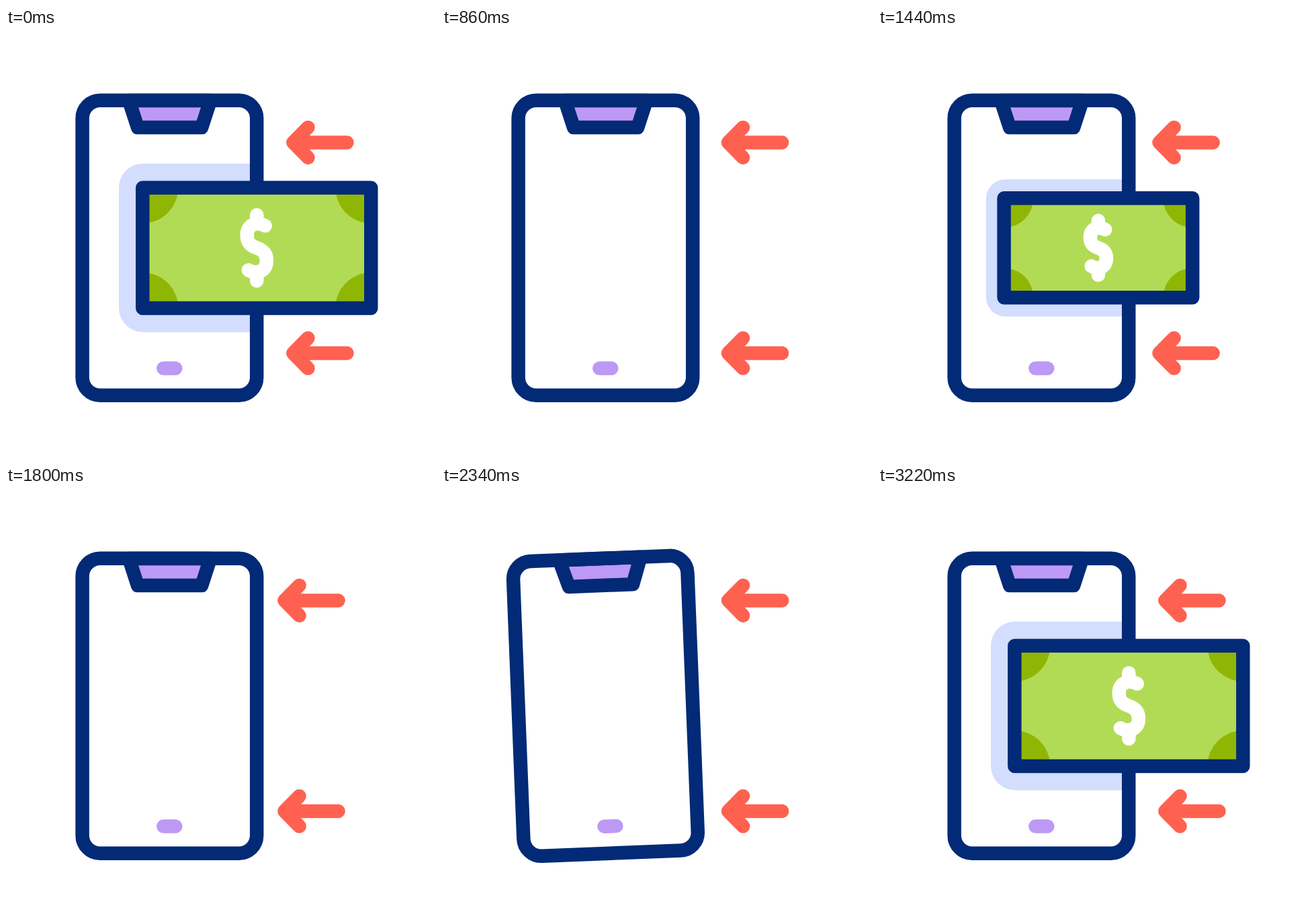
Animation, 640 px wide and 640 px high, one loop 3.62 s. Source, as an HTML page:

```html
<!DOCTYPE html>
<html>
<head>
<meta charset="utf-8">
<style>
html, body { margin: 0; width: 100%; height: 100%; overflow: hidden; background: #fff; }
svg { display: block; width: 100vw; height: 100vh; }
.line { fill: none; stroke: #032a76; stroke-width: 20.5; stroke-linecap: round; stroke-linejoin: round; }
.line, .line * { vector-effect: non-scaling-stroke; }
.red { stroke: #ff6150; }
.white { stroke: #fff; }
.lilac { stroke: #bc99f4; }
</style>
</head>
<body>
<svg viewBox="0 0 640 640">
  <defs>
    <clipPath id="screen"><rect x="113.5" y="107.8" width="249.5" height="439" rx="26"/></clipPath>
    <clipPath id="paper"><rect x="-170" y="-89.6" width="340" height="179.2"/></clipPath>
    <path id="arrow" class="line red" d="M507.5 0H427.5M449.5 -22.5L427.3 0L449.5 22.5"/>
  </defs>
  <g id="phone">
    <rect x="113.6" y="107.8" width="259.6" height="439" rx="26.5" fill="#fff"/>
    <g clip-path="url(#screen)">
      <rect id="shade" x="-205.3" y="-125.5" width="440" height="251" rx="36" fill="#d3ddfd"/>
    </g>
    <path class="line" d="M183 108L196 148H291.2L304.2 108Z" style="fill:#bc99f4"/>
    <rect class="line" x="113.6" y="107.8" width="259.6" height="439" rx="26.5"/>
    <path class="line lilac" d="M234.4 506.6H252.2"/>
  </g>
  <g id="arrows">
    <use href="#arrow" y="170.4"/>
    <use href="#arrow" y="484"/>
  </g>
  <g id="bill">
    <g clip-path="url(#paper)">
      <rect x="-170" y="-89.6" width="340" height="179.2" fill="#b2db55"/>
      <g fill="#90b605">
        <circle cx="-170" cy="-89.6" r="53"/>
        <circle cx="170" cy="-89.6" r="53"/>
        <circle cx="-170" cy="89.6" r="53"/>
        <circle cx="170" cy="89.6" r="53"/>
      </g>
    </g>
    <rect class="line" x="-170" y="-89.6" width="340" height="179.2"/>
    <path class="line white" d="M12.5 -33C4 -38 -14.6 -38 -14.6 -19C-14.6 -4 -4 -1.5 0 0C4 1.5 14.6 5 14.6 19C14.6 38 -4 38 -12.5 33M0 -49V-38M0 38V49"/>
  </g>
</svg>
<script>
const LOOP = 3620, ENTER = 400, ABSORB = 580, CYCLE = 1210, END = 3220;
const SHAKE = 1800, SWING = 210;
const [phone, shade, arrows, bill] =
  ['phone', 'shade', 'arrows', 'bill'].map(id => document.getElementById(id));

const clamp = x => Math.min(1, Math.max(0, x));
const ease = x => (x = clamp(x), x * x * (3 - 2 * x));

function place(el, x, scale) {
  el.setAttribute('transform', `translate(${x} 327.3) scale(${scale})`);
}

function moveBill(t) {
  const shrinkStart = t < ABSORB ? 0 : CYCLE;
  const arrival = t < CYCLE ? CYCLE : END;
  const absorbing = t < ABSORB || (t >= CYCLE && t < CYCLE + ABSORB);
  let x = 373.3, q = 0;
  if (absorbing) {
    q = ease((t - shrinkStart) / ABSORB);
    x -= 130 * q;
  } else {
    x += 500 * (1 - ease((t - arrival + ENTER) / ENTER));
  }
  place(bill, x, 1 - 0.5 * q);
  place(shade, x, 1 - 0.532 * q);
}

// Swings between -10 and 10 degrees, starting and ending upright
function tilt(t) {
  const s = (t - SHAKE) / SWING, i = Math.floor(s);
  const angle = k => k <= 0 || k >= 6 ? 0 : k % 2 ? -10 : 10;
  return angle(i) + (angle(i + 1) - angle(i)) * ease(s - i);
}

function draw(now) {
  const t = now % LOOP;
  moveBill(t);
  phone.setAttribute('transform', `rotate(${tilt(t)} 243.4 327.3)`);
  const nudge = t < 2400 ? 13 * (1 - Math.abs(Math.cos(Math.PI * t / 400))) : 0;
  arrows.setAttribute('transform', `translate(${-nudge} 0)`);
}

const start = performance.now();
function tick() {
  draw(performance.now() - start);
  requestAnimationFrame(tick);
}
tick();
</script>
</body>
</html>
```
